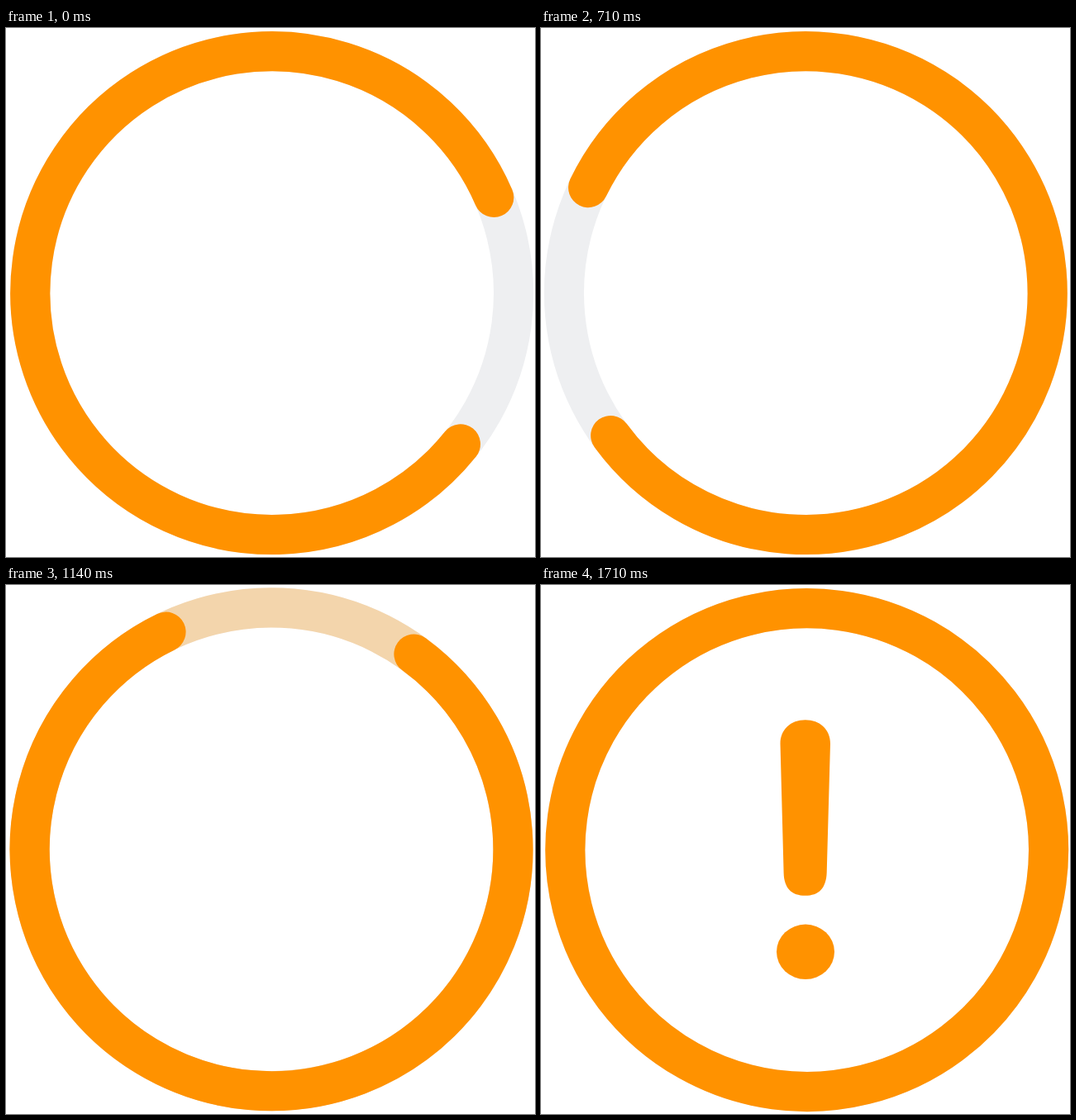
An HTML page that plays this animation: 640 by 640 pixels, repeating every 9570 ms.

```html
<!DOCTYPE html>
<html lang="en">
<head>
<meta charset="utf-8">
<title>Warning ring</title>
<style>
  html, body { margin: 0; width: 100%; height: 100%; overflow: hidden; background: #fff; }
  svg { display: block; width: 100%; height: 100%; }
  .ring { fill: none; stroke-width: 48.2; }
</style>
</head>
<body>
<svg viewBox="0 0 640 640">
  <g id="spinner">
    <circle class="ring" r="292.4" stroke="#eeeff1"/>
    <circle class="ring" id="fill" r="292.4" stroke="#ff9200"/>
    <path class="ring" id="arc" stroke="#ff9200" stroke-linecap="round"/>
  </g>
  <g id="mark" fill="#ff9200">
    <path d="M289.5 192C289.5 175 302 163.3 319.8 163.3S350 175 350 192L345.7 348C345 367 336 375.8 319.7 375.8S294 367 293.6 348Z"/>
    <ellipse cx="320" cy="443.8" rx="35" ry="33.2"/>
  </g>
</svg>
<script>
  const LOOP = 9570, END = 1710, STEP = 1000 / 14;
  const RADIUS = 292.4, HALF_GAP = 31;
  const START_ANGLE = 7.7, SPEED = .234; // degrees, degrees per ms
  const FILL_START = 1000, FILL_END = 1500;
  const DROP_START = 1150, DROP_END = 1530;

  const $ = id => document.getElementById(id);
  const spinner = $('spinner'), fill = $('fill'), arc = $('arc'), mark = $('mark');

  const progress = (t, from, to) => Math.min(1, Math.max(0, (t - from) / (to - from)));

  function polar(deg, r) {
    const a = deg * Math.PI / 180;
    return [r * Math.cos(a), r * Math.sin(a)];
  }

  arc.setAttribute('d',
    `M${polar(HALF_GAP, RADIUS)}A${RADIUS} ${RADIUS} 0 1 1 ${polar(-HALF_GAP, RADIUS)}`);

  function drawRing(t) {
    const turn = Math.min(START_ANGLE + SPEED * t, START_ANGLE + 360);
    // The ring sits slightly off its pivot
    const [dx, dy] = polar(turn, .7);
    spinner.setAttribute('transform', `translate(${321 + dx} ${320.5 + dy}) rotate(${turn})`);
    arc.setAttribute('visibility', t < FILL_END ? 'visible' : 'hidden');
    fill.setAttribute('opacity', progress(t, FILL_START, FILL_END));
  }

  function drawMark(t) {
    const fall = progress(t, DROP_START, DROP_END);
    const settle = progress(t, DROP_END, END);
    // Fall past the rest point, then swing back with decay
    const y = fall < 1
      ? -64.5 + 84.5 * fall
      : 20 * (1 - settle) * Math.cos(1.5 * Math.PI * settle);
    const squash = 1 - .1 * fall + .1 * settle;
    mark.setAttribute('opacity', fall);
    mark.setAttribute('transform', `translate(0 ${320 + y}) scale(1 ${squash}) translate(0 -320)`);
  }

  function draw(ms) {
    // Motion advances 14 times a second, with times rounded to 10 ms
    const t = Math.min(END, Math.floor((ms % LOOP + 5) / STEP) * STEP);
    drawRing(t);
    drawMark(t);
  }

  const start = performance.now();
  function tick() {
    draw(performance.now() - start);
    requestAnimationFrame(tick);
  }
  tick();
</script>
</body>
</html>
```
